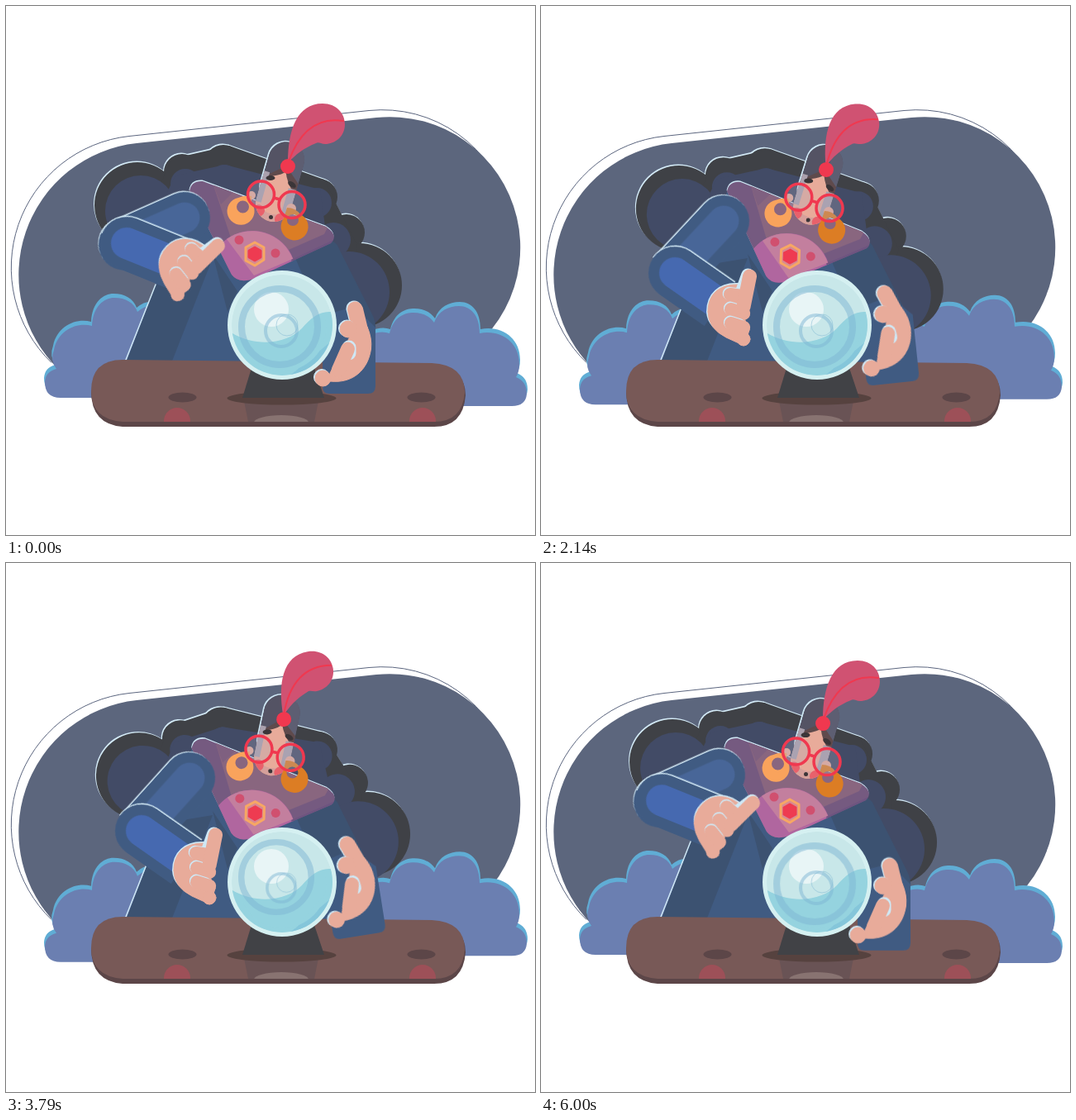
Write an HTML page without scripts that moves like this. It is 640 px wide and 640 px high and loops after 6.07 s.

```html
<!DOCTYPE html>
<html lang="en">
<head>
<meta charset="utf-8">
<title>Fortune teller</title>
<style>
html, body { margin: 0; width: 100%; height: 100%; overflow: hidden; background: #fff; }
svg { display: block; width: 100%; height: 100%; }
.line { fill: none; stroke-linecap: round; }
.skin { fill: #e8ab9a; stroke: #e8ab9a; stroke-linecap: round; }
.rim { fill: #cfe8f5; stroke: #cfe8f5; stroke-linecap: round; }
.navy { fill: #405b82; }
.dusk { fill: #3c5271; }

/* whole-loop motion */
.cloudL, .cloudR, .upper, .fore, .handL, .handR, .sleeve, .big, .small, .pose {
  animation: 6.07s ease-in-out infinite;
}
.cloudL { animation-name: sink; }
.cloudR { animation-name: rise; }
.upper { animation-name: upper; }
.fore { animation-name: fore; }
.handL { animation-name: handL; }
.handR { animation-name: handR; }
.sleeve { animation-name: sleeve; }
.big { animation-name: big; }
.small { animation-name: small; }
.pose { animation-timing-function: step-end; }
.lOpen { animation-name: lOpen; }
.lCurl { animation-name: lCurl; }
.rOpen { animation-name: rOpen; }
.rBack { animation-name: rBack; }

/* body sway, twice per loop */
.hair { transform-origin: 293px 289px; animation: hairMove 3.035s ease-in-out infinite, hairTurn 3.035s ease-in-out infinite; }
.head { transform-origin: 341px 194px; animation: headMove 3.035s ease-in-out infinite, headTurn 3.035s ease-in-out infinite; }
.plume { transform-origin: 341px 194px; animation: plumeTurn 3.035s ease-in-out infinite; }
.shawl { transform-origin: 301px 300px; animation: shawl 3.035s ease-in-out infinite; }

@keyframes sink { 50% { translate: 0 10px; } }
@keyframes rise { 50% { translate: 0 -10px; } }
@keyframes hairMove { 50% { translate: 12px 6.5px; } }
@keyframes hairTurn { 33% { rotate: -6.3deg; } 75% { rotate: .2deg; } }
@keyframes headMove { 28% { translate: -5px -5px; } 72% { translate: 4px 4px; } }
@keyframes headTurn { 35% { rotate: -4.6deg; } 75% { rotate: 1.3deg; } }
@keyframes plumeTurn { 35% { rotate: -7deg; } 50% { rotate: -10.5deg; } 75% { rotate: -6deg; } }
@keyframes shawl { 48% { translate: .5px 5px; rotate: 3.3deg; } }

@keyframes upper {
  0%, 100% { transform: translate(216px, 256px) rotate(156deg); }
  19.9% { transform: translate(224px, 262px) rotate(132deg); }
  35.3% { transform: translate(221px, 260px) rotate(133deg); }
  50.6% { transform: translate(220px, 258px) rotate(131deg); }
  62.4% { transform: translate(222px, 260px) rotate(132deg); }
  77.6% { transform: translate(225px, 263px) rotate(125deg); }
}
@keyframes fore {
  0%, 100% { transform: translate(146px, 287px) rotate(22deg); }
  19.9% { transform: translate(165px, 328px) rotate(35deg); }
  35.3% { transform: translate(162px, 323px) rotate(35deg); }
  50.6% { transform: translate(163px, 324px) rotate(35deg); }
  62.4% { transform: translate(164px, 324px) rotate(35deg); }
  77.6% { transform: translate(171px, 340px) rotate(38deg); }
}
@keyframes handL {
  0%, 100% { transform: translate(212px, 312px) rotate(34deg); }
  19.9% { transform: translate(230px, 375px) rotate(0deg); }
  35.3% { transform: translate(228px, 370px) rotate(0deg); }
  50.6% { transform: translate(229px, 371px) rotate(0deg); }
  62.4% { transform: translate(229px, 372px) rotate(0deg); }
  77.6% { transform: translate(238px, 391px) rotate(-11deg); }
}
@keyframes handR {
  0%, 100% { transform: translate(402.5px, 406.5px) rotate(0deg); }
  19.9% { transform: translate(412.5px, 359.5px) rotate(-31deg); }
  35.3% { transform: translate(407px, 391px) rotate(-15deg); }
  50.6% { transform: translate(415.5px, 376px) rotate(-15deg); }
  62.4% { transform: translate(405.5px, 384px) rotate(-17deg); }
  77.6% { transform: translate(402.5px, 352.5px) rotate(-47deg); }
}
@keyframes sleeve {
  0%, 100% { transform: translate(447px, 469px) rotate(0deg); }
  19.9% { transform: translate(459px, 433px) rotate(-15deg); }
  35.3% { transform: translate(458px, 453px) rotate(-6deg); }
  50.6% { transform: translate(454px, 445px) rotate(-9deg); }
  62.4% { transform: translate(460px, 446px) rotate(-9deg); }
  77.6% { transform: translate(466px, 412px) rotate(-23deg); }
}
@keyframes big {
  0%, 35.3%, 100% { transform: translate(331px, 388px) scale(1); }
  19.9% { transform: translate(331px, 397px) scale(.8); }
  50.6% { transform: translate(334px, 398px) scale(.8); }
  62.4% { transform: translate(327px, 380px) scale(.92); }
  77.6% { transform: translate(349px, 396px) scale(.86); }
}
@keyframes small {
  0%, 35.3%, 100% { transform: translate(333px, 393px) scale(1); }
  19.9%, 50.6% { transform: translate(337px, 394px) scale(.7); }
  62.4% { transform: translate(333px, 393px) scale(.9); }
  77.6% { transform: translate(343px, 390px) scale(.87); }
}
@keyframes lCurl { 0%, 28%, 56.5%, 88% { opacity: 1; } 10%, 43%, 70% { opacity: 0; } }
@keyframes lOpen { 0%, 28%, 56.5%, 88% { opacity: 0; } 10%, 43%, 70% { opacity: 1; } }
@keyframes rOpen { 0%, 28%, 56.5% { opacity: 1; } 10%, 43% { opacity: 0; } }
@keyframes rBack { 0%, 28%, 56.5% { opacity: 0; } 10%, 43% { opacity: 1; } }
</style>
</head>
<body>
<svg viewBox="0 0 640 640">
<defs>
  <path id="blob" d="M64 440A160 160 0 0 1 158 166L448 135A158 158 0 0 1 520 440"/>
  <path id="puffL" d="M65 469Q46 469 46 450Q47 437 60 434Q52 424 57 411C62 386 86 377 103 382C104 358 118 348 130 348C144 348 154 354 158 365Q168 356 180 358V469Z"/>
  <path id="puffR" d="M440 393Q455 387 465 391C470 371 483 366 494 366C506 366 514 371 519 378C524 364 536 358 549 358C564 358 574 370 574 391C600 386 622 402 622 428Q622 438 618 444Q631 449 631 464Q630 479 613 479H440Z"/>
  <g id="locks">
    <circle cx="159" cy="241" r="52"/><circle cx="213" cy="201" r="22"/>
    <circle cx="263" cy="191" r="23"/><circle cx="379" cy="231" r="22"/>
    <circle cx="412" cy="274" r="22"/><circle cx="428" cy="338" r="51"/>
    <path d="M159 280L200 185L270 169L385 210L425 290L400 380Z"/>
  </g>
  <path id="cape" d="M222 224Q224 211 238 212L387 267Q403 277 393 287L302 329Q282 337 273 325Z"/>
  <clipPath id="capeClip"><use href="#cape"/></clipPath>
  <clipPath id="skull"><rect x="-22" y="-26" width="44" height="99" rx="22"/></clipPath>
  <clipPath id="top"><rect x="100" y="480" width="460" height="23"/></clipPath>
  <clipPath id="globe"><circle cx="334" cy="386" r="61"/></clipPath>
  <g id="finger" stroke-width="16">
    <path class="rim" d="M-1.5 -1H10"/><path class="skin" d="M0 0H16"/>
  </g>
</defs>

<use href="#blob" x="-9" y="-8.5" fill="none" stroke="#5c667f"/>
<use href="#blob" fill="#5c667d"/>

<g class="cloudL"><use href="#puffL" fill="#60add5"/><use href="#puffL" x="1" y="5" fill="#6b7fb1"/></g>
<g class="cloudR"><use href="#puffR" fill="#60add5"/><use href="#puffR" x="-1" y="5" fill="#6b7fb1"/></g>

<g class="hair">
  <use href="#locks" x="-1" y="-1.5" fill="#d3eaf6"/>
  <use href="#locks" fill="#3f4146"/>
  <g fill="#424b66">
    <circle cx="163" cy="248" r="43"/><circle cx="217" cy="215" r="18"/>
    <circle cx="264" cy="209" r="17"/><circle cx="376" cy="238" r="18"/>
    <circle cx="396" cy="283" r="21"/><circle cx="415" cy="346" r="49"/>
    <path d="M165 285L205 205L265 192L380 222L400 370Z"/>
  </g>
</g>

<path class="navy" d="M145 432L183 332L225 225L385 285L402 300V432Z"/>
<path class="dusk" d="M145 432L190 315L250 305L200 432Z"/>
<path class="dusk" d="M250 300L280 345L268 370Z"/>
<path class="line" d="M145 428L181 337" stroke="#cfe8f5" stroke-width="1.5"/>
<path class="dusk" d="M350 305L393 284Q400 285 404 296L442 371Q448 382 447 393L400 420Z"/>

<g class="shawl">
  <use href="#cape" x="-.5" y="-1.5" fill="#cfe8f5"/>
  <use href="#cape" fill="#755a80"/>
  <g clip-path="url(#capeClip)">
    <path d="M250 214L390 266L385 276L285 320Z" fill="#89667f"/>
    <path d="M250 214L275 225L260 240Z" fill="#7f6080"/>
    <circle cx="298" cy="325" r="53" fill="#b0669f"/>
    <path d="M267 282A53 53 0 0 1 347 306L300 326Z" fill="#c37f9e"/>
    <path d="M345 307L400 281V300L350 320Z" fill="#6e5480"/>
  </g>
  <circle cx="282" cy="283" r="5.5" fill="#d0506f"/><circle cx="326" cy="299" r="5.5" fill="#d0506f"/>
  <path d="M301 286L312 292V307L301 314L290 308V292Z" fill="#d78a92" stroke="#f7a763" stroke-width="3" stroke-linejoin="round"/>
  <path d="M301 291L309 295.500V304.500L301 309L293 304.500V295.500Z" fill="#ee3b51" stroke="#ee3b51" stroke-linejoin="round"/>
</g>

<g class="head">
  <g transform="translate(338 190) rotate(16)">
    <rect x="-23.500" y="-27" width="44" height="80" rx="22" fill="#cfe8f5"/>
    <g clip-path="url(#skull)">
      <path d="M-22 -26H22V74H-22Z" fill="#545364"/>
      <path d="M6 -26H22V30H6Z" fill="#5d5e72"/>
      <path d="M-22 74V24L2 3L22 20V74Z" fill="#5f4a4c"/>
      <path d="M-22 74V32L-12 20Q2 14 3 9Q9 24 20 32V74Z" fill="#e8ab9a"/>
      <path d="M-22 16H-15V54H-22ZM12 28H22V60H12Z" fill="#aaa0ad"/>
      <path d="M-18 58Q0 70 18 58V74H-18Z" fill="#d6a09b"/>
      <circle cx="-15" cy="64" r="7" fill="#e8616b"/><circle cx="13" cy="67" r="7" fill="#e8616b"/>
    </g>
  </g>
  <circle cx="297" cy="229" r="5" fill="#e8ab9a"/><circle cx="345" cy="245" r="6" fill="#e8ab9a"/>
  <path fill-rule="evenodd" fill="#f9a35c" d="M297 238A16.500 16.500 0 1 1 281 232Q287 229 297 230ZM279 243a7.500 7.500 0 1 0 15 0a7.500 7.500 0 1 0 -15 0Z"/>
  <path fill-rule="evenodd" fill="#dc7d24" d="M340 244Q350 244 356 252A16.500 16.500 0 1 1 336 257ZM340 259a7 7 0 1 0 14 0a7 7 0 1 0 -14 0Z"/>
  <g fill="#3b3538">
    <ellipse cx="320" cy="208" rx="5.500" ry="3"/>
    <ellipse cx="346" cy="216" rx="5.500" ry="3" transform="rotate(35 346 216)"/>
    <circle cx="320.500" cy="255.500" r="2.500"/>
  </g>
  <g fill="#a9a6b8" fill-opacity=".3" stroke="#f0384f" stroke-width="3.500">
    <circle cx="308.500" cy="228" r="16"/><circle cx="346" cy="240.500" r="16"/>
    <path d="M324 232L331 234"/>
  </g>
  <g class="plume">
    <path fill="#d05272" d="M341 190C341 150 352 118 383 118C400 118 410 130 410 143C410 158 398 167 386 167C381 167 378 164 375 166C360 172 350 180 341 190Z"/>
    <path class="line" d="M342 188Q362 132 408 139" stroke="#f0384f" stroke-width="2"/>
  </g>
  <circle cx="341" cy="194" r="9" fill="#f0384f"/>
</g>

<g class="upper">
  <path class="line" d="M0 1.500H80" stroke="#d3eaf6" stroke-width="62"/>
  <path class="line" d="M0 0H80" stroke="#405b82" stroke-width="62"/>
  <path class="line" d="M0 0H80" stroke="#486698" stroke-width="37"/>
</g>
<g class="fore">
  <path fill="#d3eaf6" d="M66 -33.500H0A33 33 0 0 0 -33 0H66Z"/>
  <path class="navy" d="M66 -32H0A32 32 0 0 0 0 32H66Z"/>
  <path fill="#4669b0" d="M66 -19H0A19 19 0 0 0 0 19H66Z"/>
</g>

<path fill="#5c4648" d="M141 434L515 438Q556 438 556 471Q553 509 518 509H141Q103 506 103 466Z"/>
<path fill="#785957" d="M141 428L515 432Q555 434 555 468Q552 503 518 503H141Q103 500 103 466Q103 428 141 428Z"/>
<g fill="#5c4648"><ellipse cx="213.500" cy="473.500" rx="17" ry="6"/><ellipse cx="502.500" cy="473.500" rx="17" ry="6"/></g>
<g clip-path="url(#top)">
  <circle cx="207" cy="502" r="16" fill="#9d5058"/><circle cx="504" cy="502" r="16" fill="#9d5058"/>
  <path d="M288 478H378L373 503H293Z" fill="#695355"/>
  <ellipse cx="333" cy="504" rx="33" ry="9" fill="#887371"/>
</g>
<ellipse cx="333.500" cy="474.500" rx="66" ry="8" fill="#56423f"/>

<path class="sleeve navy" d="M0 -80V-9Q0 0 -9 0H-56Q-64 0 -64 -9V-95L-25 -105Z"/>

<path d="M297 438H373L385 474H286Z" fill="#414246"/>
<circle cx="334" cy="386" r="66" fill="#d5f0f1"/>
<g clip-path="url(#globe)">
  <circle cx="334" cy="386" r="61" fill="#c8e7e9"/>
  <path fill="#95d3df" d="M272 395C305 415 342 407 358 390C370 376 382 367 398 371V450H272Z"/>
  <path fill="#7fc0d9" fill-opacity=".7" d="M280 415A58 58 0 0 0 394 375L400 400L340 450L290 440Z"/>
  <path fill="#95d3df" d="M286 410A53 53 0 0 0 386 376V400L350 442H310Z"/>
  <circle cx="321" cy="367" r="21" fill="#e8f5f6"/>
  <g fill="none" stroke="#7eb6d3" stroke-opacity=".5">
    <circle class="big" r="46" stroke-width="8"/>
    <g class="small"><circle r="19" stroke-width="4"/><circle cx="7" cy="-7" r="13" stroke-width="1"/></g>
  </g>
</g>

<g class="handL">
  <g class="pose lCurl">
    <path class="rim" d="M-27 0C-27 -22 -12 -35 10 -34L0 30Q-26 20 -27 0Z" stroke-width="2"/>
    <path class="skin" stroke="none" d="M-26 0C-26 -22 -12 -33 10 -33L28 -30L18 8L24 22L18 41L-4 31Q-26 20 -26 0Z"/>
    <path class="rim" stroke-width="17" d="M22.500 -44L14 -20"/>
    <use href="#finger" transform="translate(1 -21) rotate(8)"/>
    <use href="#finger" transform="translate(2 -3) rotate(18)"/>
    <use href="#finger" transform="translate(2 14) rotate(18)"/>
    <path class="skin" stroke-width="17" d="M24.500 -43L17 -6"/>
    <circle class="skin" stroke="none" cx="17" cy="33" r="8"/>
  </g>
  <g class="pose lOpen">
    <path class="rim" d="M-27 0C-27 -22 -12 -34 10 -33L0 30Q-26 20 -27 0Z" stroke-width="2"/>
    <path class="skin" stroke="none" d="M-26 0C-26 -22 -12 -33 8 -32L26 -15L30 33Q25 44 14 39L-8 27Q-25 18 -26 0Z"/>
    <path class="rim" stroke-width="17" d="M19.500 -44L14 -26"/>
    <path class="skin" stroke-width="17" d="M21 -43L16 -12"/>
    <use href="#finger" transform="translate(11 -11) rotate(20)"/>
    <use href="#finger" transform="translate(12 12) rotate(22)"/>
    <use href="#finger" transform="translate(16 26) rotate(22) scale(.8 1)"/>
  </g>
</g>

<g class="handR">
  <g class="pose rOpen" transform="translate(-402.500 -406.500)">
    <path class="rim" stroke-width="19" d="M421 366L424 378"/>
    <path class="skin" stroke-width="19" d="M422.500 367L430 398"/>
    <path class="skin" stroke="none" d="M424 385L437 388Q443 402 441.500 415C438 440 420 457 392 454L392 444L412 408Z"/>
    <circle class="rim" stroke="none" cx="412.500" cy="390" r="10"/>
    <circle class="skin" stroke="none" cx="414" cy="391" r="10"/>
    <path class="rim" stroke-width="17" d="M415 413V420"/>
    <path class="skin" stroke-width="17" d="M413.500 415L402 441"/>
    <circle class="rim" stroke="none" cx="382" cy="449" r="9.500"/>
    <circle class="skin" stroke="none" cx="383.500" cy="450.500" r="9.500"/>
  </g>
  <g class="pose rBack">
    <g transform="rotate(31) translate(-412.500 -359.500)">
      <path class="rim" stroke-width="18" d="M392 324L400 334"/>
      <path class="skin" stroke-width="18" d="M394 326L408 344"/>
      <path class="rim" d="M402 338L407 413" stroke-width="3"/>
      <path class="skin" stroke="none" d="M403 335L407.500 414L417 410L440 385L425 335Z"/>
      <path class="rim" stroke-width="18" d="M409 330L411 338"/>
      <path class="skin" stroke-width="18" d="M410 332L416 350"/>
      <path class="rim" stroke-width="18" d="M427 346L430 358"/>
      <path class="skin" stroke-width="18" d="M428.500 348L437 372"/>
      <circle class="rim" stroke="none" cx="431" cy="393" r="9.500"/>
      <circle class="skin" stroke="none" cx="432.500" cy="395" r="9.500"/>
    </g>
  </g>
</g>
</svg>
</body>
</html>
```
